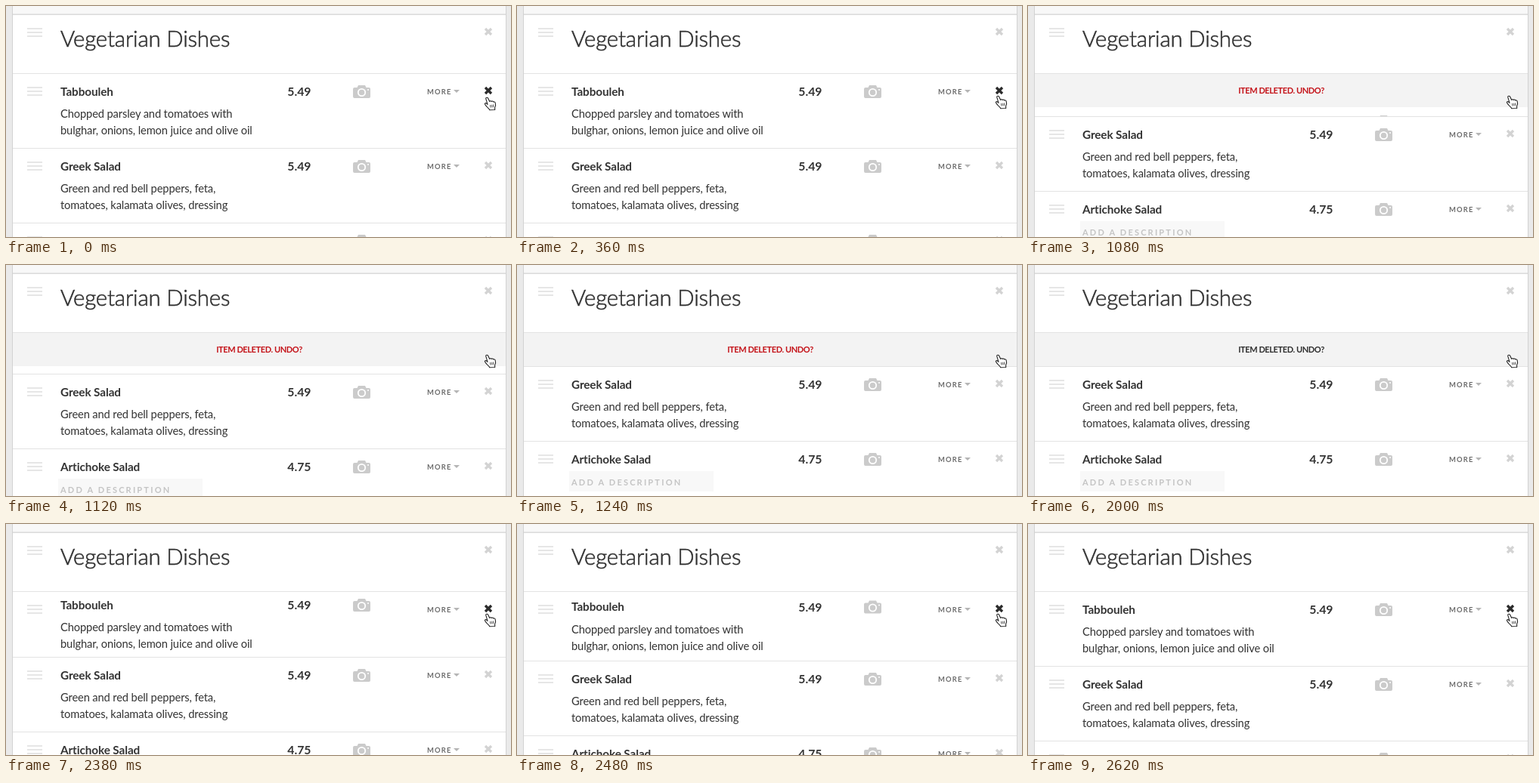
Recreate the animation shown at these times as an HTML page. Size 668 px wide and 306 px high, loop 2660 ms.

```html
<!DOCTYPE html>
<html lang="en">
<head>
<meta charset="utf-8">
<title>Menu editor</title>
<style>
  html, body { margin: 0; width: 100%; height: 100%; overflow: hidden; background: #eaeaea; }
  svg { display: block; width: 668px; height: 306px; }
  text { font: 14.7px Lato, "Open Sans", sans-serif; letter-spacing: -.13px; fill: #333; white-space: pre; }
  .heading { font-size: 29.3px; font-weight: 300; stroke: #333; stroke-width: .6px; }
  .name { font-size: 15.3px; font-weight: 700; letter-spacing: -.1px; }
  .price { font-size: 15.8px; font-weight: 700; letter-spacing: 0; text-anchor: end; }
  .more { font-size: 9.4px; font-weight: 700; letter-spacing: 1.2px; fill: #6c6c6c; }
  .hint { font-size: 11px; font-weight: 700; letter-spacing: 2.2px; fill: #c4c4c4; }
  .notice { font-size: 11px; font-weight: 700; letter-spacing: -.4px; text-anchor: middle; }
  .cross { stroke: #d3d3d3; stroke-width: 3.3; fill: none; }
  .hover .cross { stroke: #2b2b2b; }
</style>
</head>
<body>
<svg id="stage" viewBox="0 0 668 306"></svg>
<script>
const LOOP = 2660, TOP = 89, ROW = 99, BANNER = 45, PAD = 12;

const rect = (x, y, w, h, fill) =>
  `<rect x="${x}" y="${y}" width="${w}" height="${h}" fill="${fill}"/>`;
const label = (x, y, text, cls = "") => `<text class="${cls}" x="${x}" y="${y}">${text}</text>`;
const grip = y => [0, 5, 10].map(d => rect(28, y + d, 20, 2, "#e6e6e6")).join("");
const cross = y => `<path class="cross" d="M634 ${y - 4}l8 8m0-8l-8 8"/>`;

const camera = `<path fill="#cbcbcb" d="M461 19h3.5l1.5-3h9l1.5 3h3.5q2 0 2 2v10q0 2-2 2h-19q-2 0-2-2v-10q0-2 2-2z"/>
  <circle cx="470.5" cy="25.5" r="4.7" fill="none" stroke="#fff" stroke-width="1.8"/>
  <circle cx="479" cy="22" r="1" fill="#fff"/>`;

function row(id, name, price, lines) {
  const about = lines
    ? lines.map((s, i) => label(72, 59 + 22 * i, s)).join("")
    : rect(69, 40, 191, 27, "#f8f8f8") + label(72, 58.5, "ADD A DESCRIPTION", "hint");
  return `<g id="${id}">${rect(9, 0, 652, 200, "#fff")}${rect(9, 0, 652, 1, "#e3e3e3")}
    <g class="body">${label(72, 29.6, name, "name")}${label(403.5, 30, price, "price")}${camera}${about}</g>
    ${grip(18)}${label(557, 28, "MORE", "more")}
    <path d="M592 22h8l-4 4z" fill="#b5b5b5"/>${cross(23)}</g>`;
}

const stage = document.getElementById("stage");
stage.innerHTML = `
  ${rect(8, 0, 654, 306, "#d2d2d2")}${rect(9, 0, 652, 306, "#fff")}
  ${rect(9, 0, 652, 10, "#f8f8f8")}${rect(9, 10, 652, 1, "#e6e6e6")}${rect(9, 11, 652, 1, "#dcdcdc")}
  ${grip(29)}${label(72, 54, "Vegetarian Dishes", "heading")}${cross(34)}
  ${row("first", "Tabbouleh", "5.49",
    ["Chopped parsley and tomatoes with", "bulghar, onions, lemon juice and olive oil"])}
  <g id="banner">${rect(9, TOP, 652, 217, "#fff")}${rect(9, TOP, 652, 1, "#e3e3e3")}
    ${rect(9, TOP + 1, 652, 44, "#f3f3f3")}${label(335, 116, "ITEM DELETED. UNDO?", "notice")}
    <g id="ghost">${camera}</g></g>
  ${row("second", "Greek Salad", "5.49",
    ["Green and red bell peppers, feta,", "tomatoes, kalamata olives, dressing"])}
  ${row("third", "Artichoke Salad", "4.75")}
  <g id="hand" stroke="#222" stroke-linejoin="round">
    <path fill="#fff" stroke-width="1.1" d="M2 2.2C2 .6 4.2 .2 5 1.8L7 6C7.6 5 9 5 9.6 6C10.4 5.2 11.6 5.4 12 6.6
      C13.2 6 14.4 6.8 14.6 8.2C15.2 10.5 15 12.5 13.9 14.2L14 17L7 17.3
      C6.6 15.5 4.5 14.6 3.2 12.8L.9 9.8C.2 8.5 1.8 7.6 2.9 8.6L4.3 9.8Z"/>
    <path fill="none" stroke-width=".8" d="M7.8 10.5l.5 3.5M9.9 10.3l.4 3.5M12 10l.2 3.5"/></g>`;

const el = id => document.getElementById(id);
const [first, banner, ghost, second, third, hand] =
  ["first", "banner", "ghost", "second", "third", "hand"].map(el);
const body = first.querySelector(".body"), notice = banner.querySelector(".notice");
first.classList.add("hover");

const ramp = (t, a, b) => Math.min(1, Math.max(0, (t - a) / (b - a)));
const swing = p => .5 - Math.cos(p * Math.PI) / 2;
const move = (node, x, y) => node.setAttribute("transform", `translate(${x} ${y})`);
const mix = (a, b, p) => `rgb(${a.map((v, i) => Math.round(v + (b[i] - v) * p))})`;

function draw(t) {
  const deleted = t >= 1080 && t < 2380;
  const lost = Math.round(PAD * (deleted
    ? swing(ramp(t, 1080, 1240))
    : t < 1080 ? 0 : 1 - swing(ramp(t, 2380, 2620))));
  const next = TOP + (deleted ? BANNER + PAD : ROW) - lost;

  first.style.display = deleted ? "none" : "";
  banner.style.display = deleted ? "" : "none";
  move(first, 0, TOP);
  move(body, 0, -lost / 2);
  move(ghost, 0, 129 - lost / 2);
  move(second, 0, next);
  move(third, 0, next + ROW);
  move(hand, 632.7, 118.5 + (t < 20 ? 2 : t < 40 ? 1 : 0));
  notice.style.fill = mix([196, 18, 24], [45, 45, 45], ramp(t, 1880, 2000));
}

const start = performance.now();
function tick() {
  draw((performance.now() - start) % LOOP);
  requestAnimationFrame(tick);
}
draw(0);
requestAnimationFrame(tick);
</script>
</body>
</html>
```
